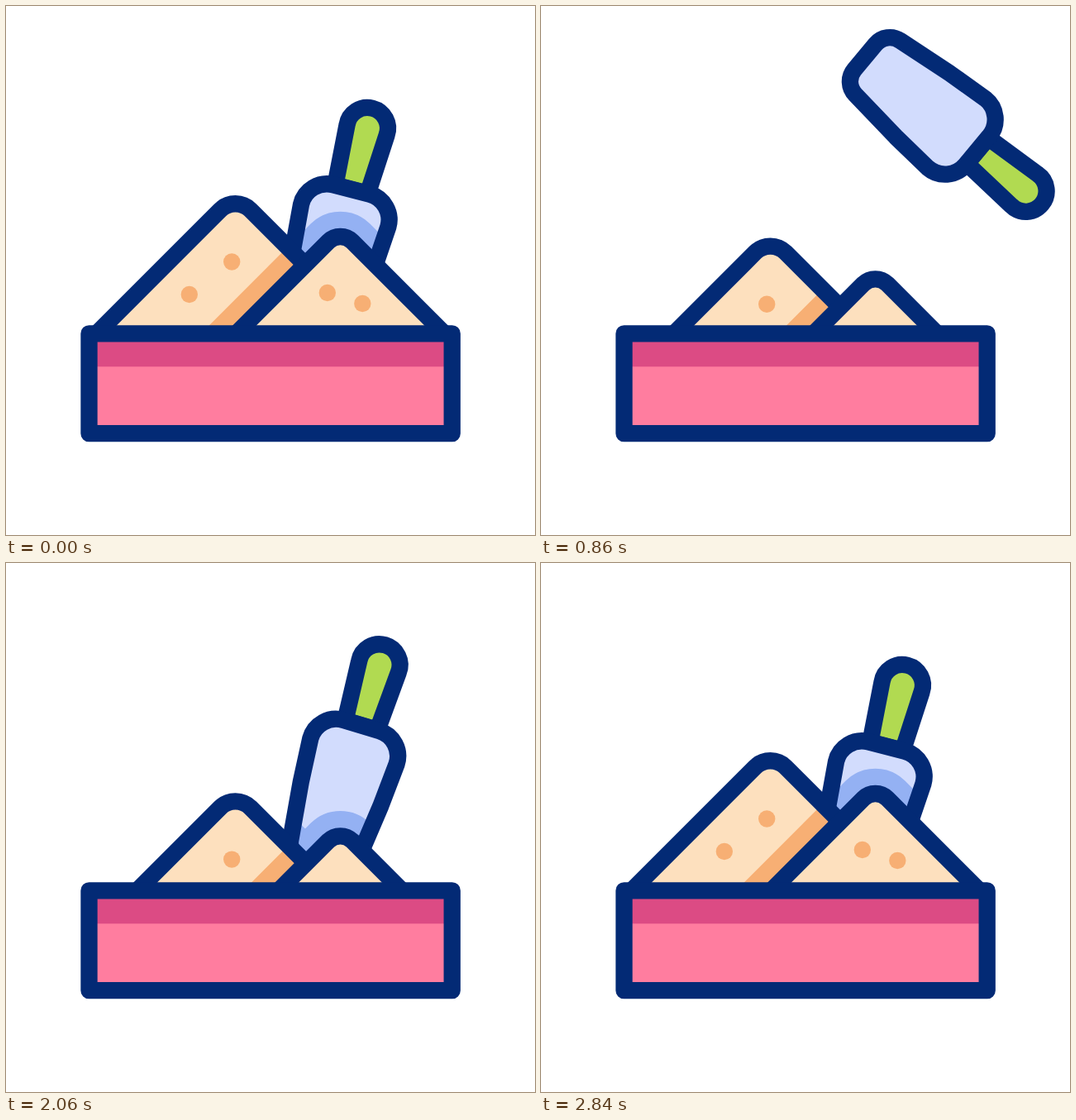
Recreate the animation shown at these times as an HTML page. Size 640 by 640 pixels, loop 3600 ms.

```html
<!DOCTYPE html>
<html lang="en">
<head>
<meta charset="utf-8">
<title>Sandbox</title>
<style>
  html, body { margin: 0; width: 100%; height: 100%; overflow: hidden; background: #fff; }
  svg { display: block; width: 100vw; height: 100vh; }
  .line { fill: none; stroke: #032a75; stroke-width: 20.3; stroke-linejoin: round; }
  .sand { fill: #fde0be; }
  .grain { fill: #f7af74; }
  .shade { stroke-width: 60.6; }
  .warm { fill: #f7af74; stroke: #f7af74; }
  .cool { fill: #94b1f3; stroke: #94b1f3; }
</style>
</head>
<body>
<svg viewBox="0 0 640 640">
  <defs>
    <path id="big"/>
    <path id="small"/>
    <path id="blade" d="M-22.5 10.3H22.5A32 32 0 0 1 54.4 43L50.4 97L42.4 167A22.5 22.5 0 0 1 20 187.3H-20A22.5 22.5 0 0 1 -42.4 167L-50.4 97L-54.4 43A32 32 0 0 1 -22.5 10.3Z"/>
    <path id="handle" d="M-20.3 10L-24.8 -64A24.9 24.9 0 1 1 24.8 -64L20.3 10Z"/>
    <clipPath id="aboveBox"><rect width="640" height="397"/></clipPath>
    <clipPath id="inBlade"><use href="#blade" class="scoop"/></clipPath>
    <clipPath id="inBig"><use href="#big" class="bigMove"/></clipPath>
  </defs>

  <g id="flakes" fill="none" stroke="#f7af74" stroke-linecap="round"></g>

  <g class="scoop">
    <use href="#handle" fill="#b1da51"/>
    <use href="#handle" class="line"/>
    <use href="#blade" fill="#d2dcfd"/>
  </g>
  <g clip-path="url(#inBlade)">
    <g class="smallMove shade cool">
      <use href="#big"/>
      <use href="#small"/>
    </g>
  </g>
  <g class="scoop"><use href="#blade" class="line"/></g>

  <g clip-path="url(#aboveBox)">
    <g class="bigMove">
      <use href="#big" class="sand"/>
      <circle class="grain" cx="273.2" cy="309.5" r="10.2"/>
      <circle class="grain" cx="221.8" cy="349" r="10.2"/>
    </g>
    <g clip-path="url(#inBig)">
      <g class="smallMove shade warm"><use href="#small"/></g>
    </g>
    <g class="bigMove"><use href="#big" class="line"/></g>
    <g class="smallMove">
      <use href="#small" class="sand"/>
      <circle class="grain" cx="388.8" cy="347" r="10.2"/>
      <circle class="grain" cx="431.3" cy="360" r="10.2"/>
      <use href="#small" class="line"/>
    </g>
  </g>

  <rect x="100.5" y="396.3" width="439.2" height="120.9" fill="#ff7d9f"/>
  <rect x="100.5" y="396.3" width="439.2" height="40" fill="#dc4b84"/>
  <rect x="100.5" y="396.3" width="439.2" height="120.9" class="line"/>
</svg>
<script>
const LOOP = 3600, BURST = 2180, BURST_LEN = 380;

const all = sel => [...document.querySelectorAll(sel)];
const move = (els, value) => els.forEach(el => el.setAttribute('transform', value));

// 0 to 1 between two times, slow at both ends
function ease(t, from, to) {
  const u = Math.min(1, Math.max(0, (t - from) / (to - from)));
  return u * u * (3 - 2 * u);
}

// 0 towards 1 with a long soft tail
const settle = (t, span, power) => 1 - Math.exp(-((t / span) ** power));

function hill(id, x, y, r) {
  const o = r / Math.SQRT2;
  document.getElementById(id).setAttribute('d',
    `M${x - 200} ${y + 200}L${x - o} ${y + o}A${r} ${r} 0 0 1 ${x + o} ${y + o}L${x + 200} ${y + 200}`);
}

// A hill sinks, later rises a little too far and comes to rest
function sink(t, down, up) {
  const top = up + 340;
  return 51.3 * ease(t, down, down + 280) - 55.3 * ease(t, up, top) + 4 * ease(t, top, top + 340);
}

// The scoop swings out, turns back, plunges and lifts to rest
function scoopPose(t) {
  const rest = ease(t, 2340, 2600);
  const x = 420.5 + 115.5 * settle(t, 342, 2) - 121 * ease(t, 1750, 2160) + 5.5 * rest;
  const y = 212 - 30.5 * ease(t, 0, 300) + 54.5 * ease(t, 2005, 2300) - 24 * rest;
  const turn = 14.5 + 128 * (settle(t, 452, 1.3) - ease(t, 1600, 2100));
  return `translate(${x} ${y}) rotate(${turn})`;
}

hill('big', 277.5, 228.5, 26);
hill('small', 404.5, 270.5, 20.5);

const scoop = all('.scoop'), bigParts = all('.bigMove'), smallParts = all('.smallMove');
const flakeBox = document.getElementById('flakes');

// A low and a high flake fly off to each side
const flakes = [-1, 1].flatMap(side => [
  { reach: 287 * side, lift: 42 },
  { reach: 146 * side, lift: 163 }
]);
for (const f of flakes) {
  f.el = flakeBox.appendChild(document.createElementNS('http://www.w3.org/2000/svg', 'path'));
}

function drawFlakes(t) {
  const k = (t - BURST) / BURST_LEN;
  const on = k > 0 && k < 1;
  flakeBox.style.display = on ? '' : 'none';
  if (!on) return;
  const out = k * (2 - k), size = Math.min(1, (1 - k) / 0.3);
  flakeBox.setAttribute('stroke-width', 20.3 * size);
  for (const { reach, lift, el } of flakes) {
    const x = 349 + reach * (0.25 + 0.75 * out);
    const y = 335 - lift * out + 60 * k * k;
    el.setAttribute('d', `M${x - 6 * size} ${y}h${12 * size}`);
  }
}

function draw(t) {
  move(scoop, scoopPose(t));
  move(bigParts, `translate(0 ${sink(t, 0, 2020)})`);
  move(smallParts, `translate(0 ${sink(t, 200, 2100)})`);
  drawFlakes(t);
}

const start = performance.now();
function tick() {
  draw((performance.now() - start) % LOOP);
  requestAnimationFrame(tick);
}
draw(0);
requestAnimationFrame(tick);
</script>
</body>
</html>
```
